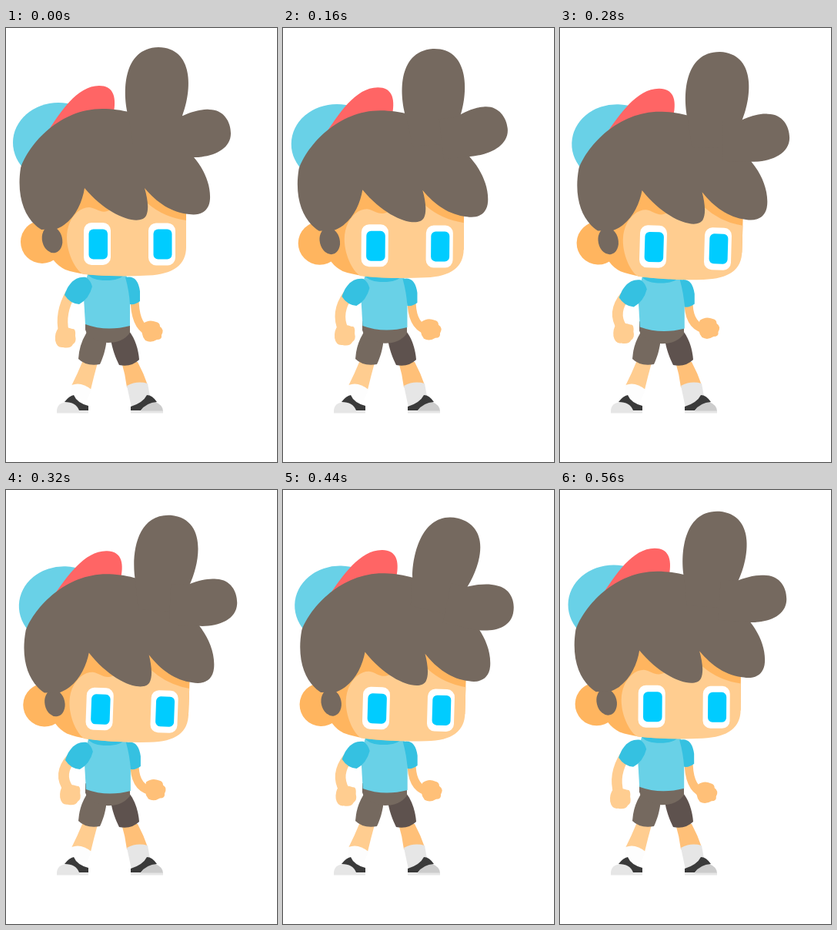
Recreate the animation shown at these times as an HTML page. Size 352 px wide and 564 px high, loop 600 ms.

```html
<!DOCTYPE html>
<html lang="en">
<head>
<meta charset="utf-8">
<title>Idle boy</title>
<style>
  html, body { margin: 0; width: 100%; height: 100%; overflow: hidden; background: #fff; }
  svg { display: block; width: 352px; height: 564px; }
  .hair { fill: #75695f; }
  .skin { fill: #ffcd90; }
  .tan { fill: #ffc078; }
  .shade { fill: #ffb55f; }
  .shirt { fill: #69d1e7; }
  .sleeve { fill: #35c1e1; }
  .dark { fill: #3a3a3a; }
  .arm { fill: none; stroke: #ffcd90; stroke-width: 13.5; }
  .arm.far { stroke: #ffc078; stroke-width: 11; }
</style>
</head>
<body>
<svg viewBox="0 0 352 564">
  <!-- legs and shoes -->
  <path class="skin" d="M100 432L119 435Q114 453 110 470Q98 461 85 465Q93 449 100 432Z"/>
  <path class="tan" d="M150 434L171 434Q179 449 184 464L157 467Q155 450 150 434Z"/>
  <path fill="#fdfdfd" d="M85 464Q98 459 111 470L105 484L84 482Z"/>
  <path fill="#e6e6e6" d="M157 465Q170 458 184 462L187 479L178 490L163 493Z"/>
  <path fill="#e6e6e6" d="M66 498Q66 487 79 486Q93 487 95 498Z"/>
  <path class="dark" d="M76 486Q82 478 88 477Q92 487 107 491V497H95Q91 486 76 486Z"/>
  <path fill="#ccc" d="M175 498Q180 487 194 486Q204 490 204 498Z"/>
  <path class="dark" d="M162 497V492Q178 487 183 477Q190 477 196 486Q182 487 175 497Z"/>
  <path fill="#e6e6e6" d="M66 497.500h41v3h-41zM162 497.500h42v3h-42z"/>

  <!-- shorts -->
  <path fill="#5e524e" d="M136 404C138 418 143 430 147 438Q163 441 173 431C172 418 168 404 160 394Z"/>
  <path class="hair" d="M106 390L104 397Q95 412 94 430Q104 440 122 437C126 428 129 420 131 404Z"/>
  <path id="hips" class="hair" d="M103 380H161V396Q152 409 132 409Q107 406 103 392Z"/>

  <!-- arms and shirt -->
  <path id="farArm" class="arm far"/>
  <path id="farHand" class="tan" d="M178 384Q186 378 195 382Q200 383 200 388Q206 392 202 399Q203 405 196 405Q188 410 181 406Q174 398 178 384Z"/>
  <path id="nearArm" class="arm"/>
  <path id="nearHand" class="skin" d="M68 390Q63 396 64 406Q66 416 74 415Q84 417 87 411Q92 408 90 400Q91 390 86 391Q80 388 68 390Z"/>
  <g id="torso">
    <path class="shirt" d="M106 320Q101 337 101 350L103 385Q130 395 161 387V330L155 320Z"/>
    <path class="sleeve" d="M106 320H154Q148 328 130 328Q112 328 106 320Z"/>
    <path class="sleeve" d="M104 324C88 322 80 335 76 347Q83 358 95 359Q108 352 112 336Q110 328 104 324Z"/>
    <path class="sleeve" d="M155 324Q171 320 174 342V355Q168 360 161 359Q160 342 155 324Z"/>
  </g>

  <g id="head">
    <ellipse class="shirt" cx="68" cy="149" rx="59" ry="52"/>
    <path fill="#ff6565" d="M52 138C70 110 92 75 121 75C138 75 144 87 140 110Z"/>
    <circle class="shade" cx="47" cy="278" r="28"/>
    <path class="shade" d="M55 190V286Q59 305 77 314Q100 322 140 322L234 285V190Z"/>
    <path class="skin" d="M79 272C79 250 93 233 108 233C118 234 124 243 136 236L176 240Q186 240 184 228Q205 246 234 250V283Q235 319 185 321.500Q140 324 100 320C88 312 79 290 79 272Z"/>
    <g fill="#fff">
      <rect x="101" y="253" width="35" height="55" rx="10"/>
      <rect x="185" y="253.500" width="35" height="55" rx="10"/>
    </g>
    <g fill="#0cf">
      <rect x="107.500" y="261.500" width="24.500" height="39" rx="6"/>
      <rect x="191.500" y="261.500" width="24" height="39" rx="6"/>
    </g>
    <g class="hair">
      <ellipse cx="60" cy="275" rx="13" ry="17.500" transform="rotate(-14 60 275)"/>
      <path d="M46 262C26 250 13 222 19 182C30 150 70 105 125 105C150 105 175 112 190 120L225 145L244 168C256 182 266 202 265 222C264 240 250 244 238 242C215 240 196 227 180 208C184 222 186 236 182 244C174 258 134 246 102 208C99 228 88 252 66 261Z"/>
      <path id="topTuft" d="M159 115C151 85 151 26 198 25C244 26 242 80 229 114V150H165Z"/>
      <path id="sideTuft" d="M227 115C238 110 252 105 264 106C283 106 292 122 292 137C292 158 268 168 244 168H205V115Z"/>
    </g>
  </g>
</svg>
<script>
const LOOP = 600, STEP = 40;
const parts = Object.fromEntries(
  ["hips", "farArm", "farHand", "nearArm", "nearHand", "torso", "head", "topTuft", "sideTuft"]
    .map(id => [id, document.getElementById(id)]));

// Keyframes are [time, value] pairs with linear motion between them.
const bobKeys = [[0, 0], [360, 1], [600, 0]];
const tiltKeys = [[0, 0], [120, .1], [160, .19], [360, 1], [600, 0]];
const topKeys = [[0, 0], [160, -3.7], [280, 0], [360, 4.5], [440, 12], [480, 12], [600, 0]];
const sideKeys = [[0, 0], [80, -4], [160, -7], [280, -2], [360, 3], [440, 10], [480, 9.5], [600, 0]];

function at(keys, t) {
  const i = keys.findIndex(k => k[0] > t);
  const [t0, a] = keys[i - 1], [t1, b] = keys[i];
  return a + (b - a) * (t - t0) / (t1 - t0);
}

const place = (part, x, y, turn = "") =>
  part.setAttribute("transform", `translate(${x} ${y}) ${turn}`);

function draw(t) {
  const bob = at(bobKeys, t), tilt = at(tiltKeys, t);
  place(parts.torso, bob, 4.5 * bob);
  place(parts.hips, 0, 1.5 * bob);
  place(parts.nearHand, 7 * bob, -7 * bob);
  place(parts.farHand, 4.5 * bob, -5 * bob);
  parts.nearArm.setAttribute("d",
    `M${84 + bob} ${345 + 4 * bob}Q${69.5 - 3 * bob} ${370 - bob} ${75 + 7 * bob} ${395 - 7 * bob}`);
  parts.farArm.setAttribute("d",
    `M167 ${350 + 4 * bob}Q${167 - bob} ${386 - bob} ${184 + 3 * bob} ${394 - 4 * bob}`);
  place(parts.head, 2 * tilt, 5.7 * bob, `rotate(${2.4 * tilt} 150 322)`);
  place(parts.topTuft, 0, 0, `rotate(${at(topKeys, t)} 180 122)`);
  place(parts.sideTuft, 0, 0, `rotate(${at(sideKeys, t)} 205 150)`);
}

function tick() {
  draw(Math.floor(performance.now() % LOOP / STEP) * STEP);
  requestAnimationFrame(tick);
}
tick();
</script>
</body>
</html>
```
